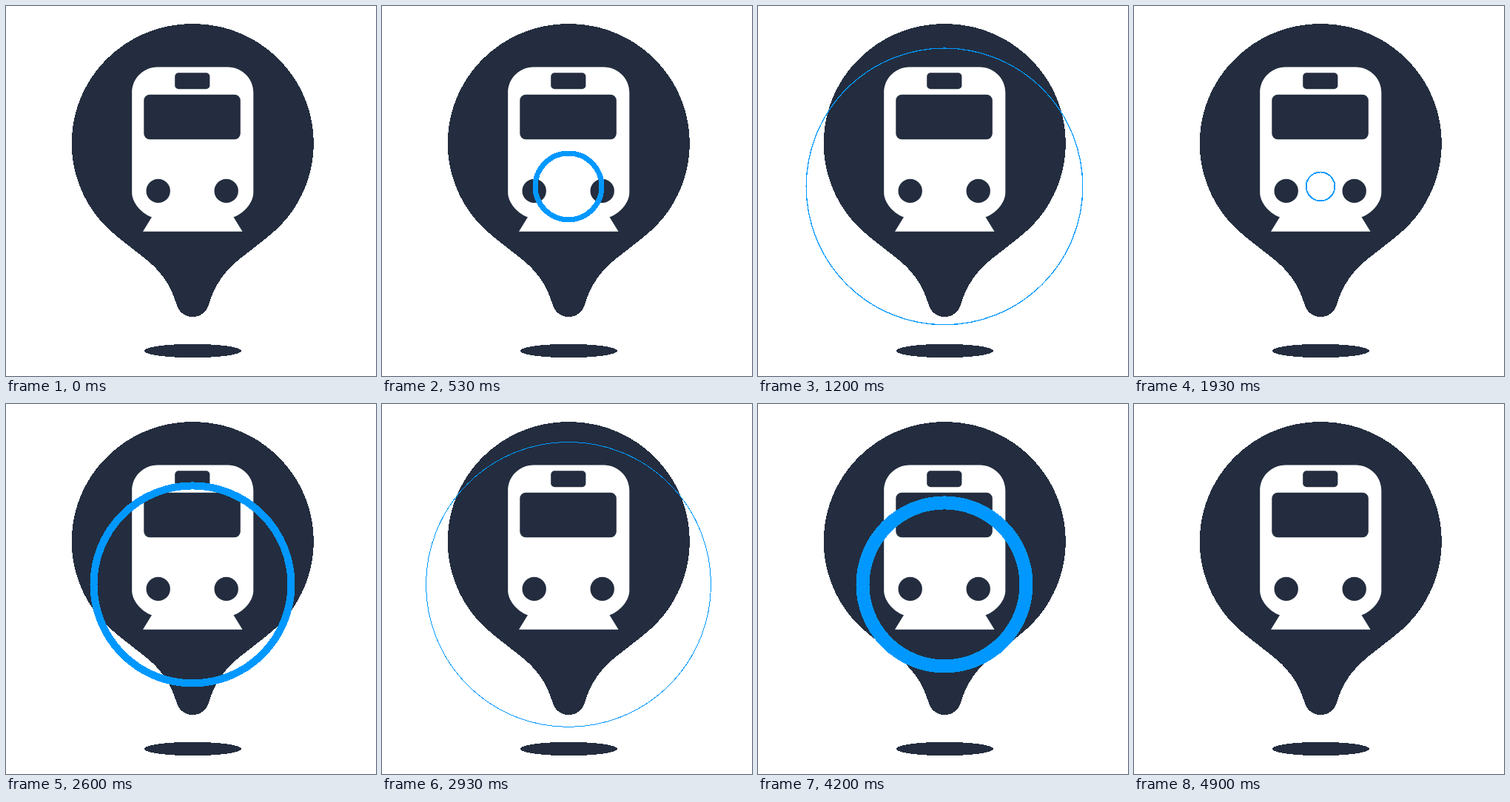
Animation of 500x500 px, one loop 5.03 s. Source, as an HTML page:

```html
<!DOCTYPE html>
<html lang="en">
<head>
<meta charset="utf-8">
<title>Train stop pin</title>
<style>
  html, body { margin: 0; width: 100%; height: 100%; overflow: hidden; background: #fff; }
  svg { display: block; width: 100%; height: 100%; }
</style>
</head>
<body>
<svg viewBox="0 0 500 500">
  <g fill="#232d3f" shape-rendering="crispEdges">
    <path d="M152.500 313.400A163.500 161.500 0 1 1 352 313.400C341.500 321.500 329.500 331.500 317.500 340.500C297.500 356 282.500 375 274.100 403A22.500 22.500 0 0 1 230.400 403C222 375 207 356 187 340.500C175 331.500 163 321.500 152.500 313.400Z"/>
    <ellipse cx="252.300" cy="466" rx="65.500" ry="9.200"/>
  </g>
  <path fill="#fff" d="M205 82.500H299.500C319 82.500 334.300 98 334.300 117V252C334.300 265 322.500 280 307.500 285.300L319.500 304.700H185L197 285.300C182 280 170.200 265 170.200 252V117C170.200 98 185.500 82.500 205 82.500Z"/>
  <g fill="#232d3f">
    <rect x="228.200" y="90.300" width="47.200" height="22" rx="5"/>
    <rect x="186.300" y="119.700" width="130.500" height="60.600" rx="8"/>
    <circle cx="205.700" cy="249.900" r="16.200"/>
    <circle cx="297.700" cy="249.900" r="16.200"/>
  </g>
  <circle id="ring" cx="252" cy="243.900" fill="none" stroke="#0098ff" shape-rendering="crispEdges"/>
</svg>
<script>
  const LOOP = 5030;   // ms
  const TICK = 100 / 3; // display interval, ms
  const STEP = 40;     // animation step, ms
  const CYCLE = 42;    // steps per pulse
  const LAST = 37;     // last step with a visible ring

  // [step, value]
  const outer = [[0, 1], [6, 20.3], [14, 54.5], [21, 119.5], [23, 138.5], [27, 168], [31, 193], [37, 219]];
  const width = [[0, 0.8], [6, 1.8], [13, 7], [20, 18.5], [21, 18], [23, 10], [27, 3.2], [31, 1], [37, 0.5]];

  const ring = document.getElementById('ring');

  // Smooth curve through the keys
  function curve(keys, x) {
    const end = keys.length - 1;
    let i = 0;
    while (i < end - 1 && x > keys[i + 1][0]) i++;
    const slope = k => {
      const a = keys[Math.max(k - 1, 0)], b = keys[Math.min(k + 1, end)];
      return (b[1] - a[1]) / (b[0] - a[0]);
    };
    const [x0, y0] = keys[i], [x1, y1] = keys[i + 1];
    const h = x1 - x0, u = (x - x0) / h, v = 1 - u;
    return y0 * v * v * (1 + 2 * u) + y1 * u * u * (1 + 2 * v)
      + h * u * v * (slope(i) * v - slope(i + 1) * u);
  }

  function draw(ms) {
    const tick = Math.floor((ms % LOOP + 3.34) / TICK);
    const step = Math.floor(tick * TICK / STEP + 1e-6) % CYCLE;
    const shown = step > 0 && step <= LAST;
    ring.style.display = shown ? '' : 'none';
    if (!shown) return;
    const w = curve(width, step);
    ring.setAttribute('r', Math.max(0, curve(outer, step) - w / 2));
    ring.setAttribute('stroke-width', w);
  }

  const start = performance.now();
  function loop() {
    draw(performance.now() - start);
    requestAnimationFrame(loop);
  }
  draw(0);
  requestAnimationFrame(loop);
</script>
</body>
</html>
```
